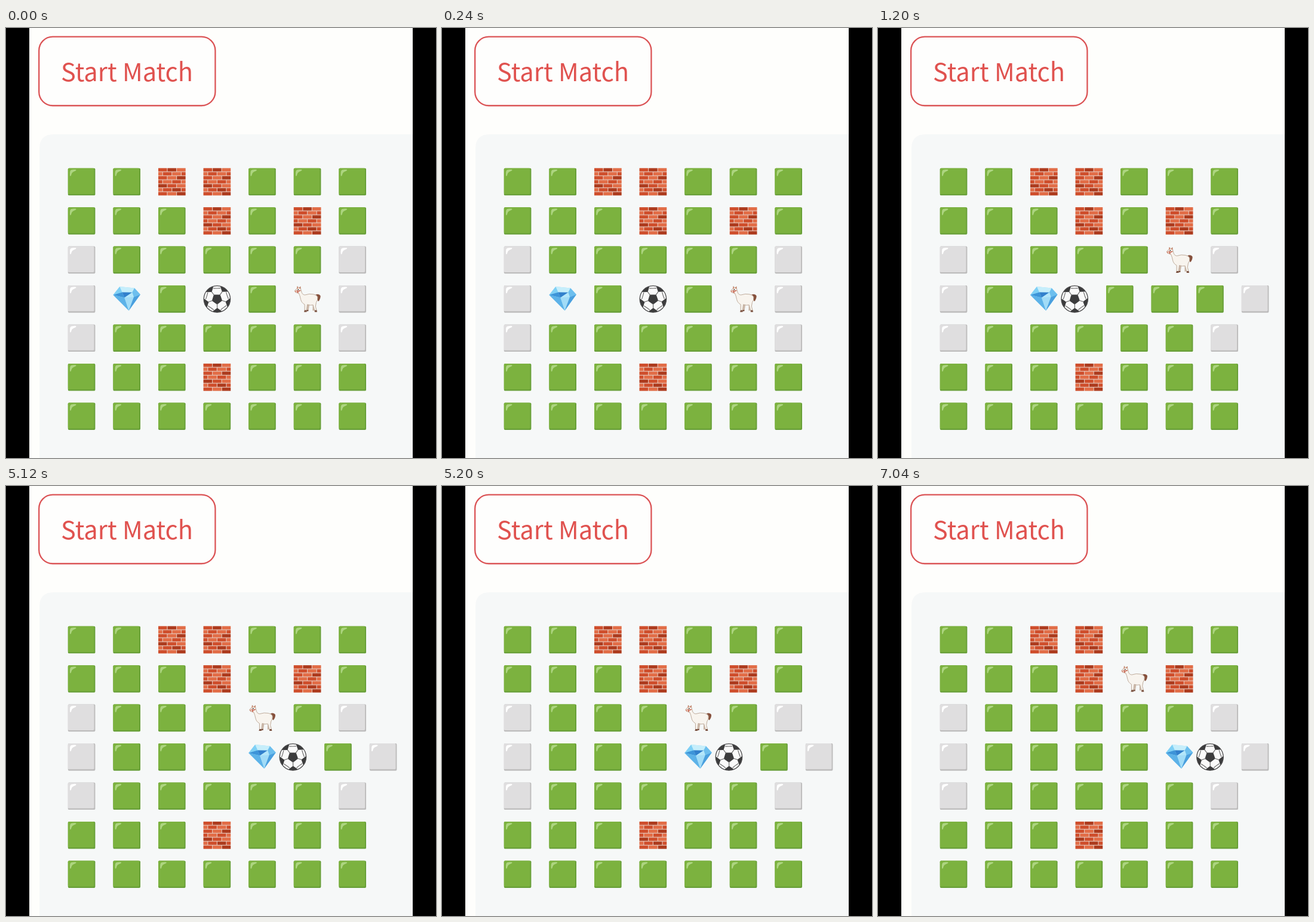
Write an HTML page that moves like this. It is 720 px wide and 720 px high and loops after 8000 ms.

```html
<!DOCTYPE html>
<html lang="en">
<head>
<meta charset="utf-8">
<title>Start Match</title>
<style>
  html, body { margin: 0; width: 100%; height: 100%; overflow: hidden; background: #000; }
  svg { display: block; width: 100%; height: 100%; }
  text { font: 41.6px "Noto Sans CJK JP", "Noto Sans CJK SC", "Noto Sans CJK", "Open Sans", sans-serif; }
  #board, #button { filter: blur(.45px); }
</style>
</head>
<body>
<svg viewBox="0 0 720 720">
  <defs>
    <clipPath id="disc"><circle cx="64" cy="64" r="59"/></clipPath>
    <path id="glare" d="M40 13c0-2.300-1.600-3-10.800-2.700c-7.700.3-11.500 1.200-13.800 4c-2.300 2.800-2.900 8.500-3 15.300c0 4.800 0 9.300 2.500 9.300c3.400 0 3.400-7.900 6.200-12.300C26.700 18 40 17 40 13z"/>
    <g id="grass">
      <rect x="4" y="4" width="120" height="120" rx="5" fill="#689f38"/>
      <rect x="4" y="4" width="115" height="114" rx="5" fill="#7cb23f"/>
      <use href="#glare" fill="#add580"/>
    </g>
    <g id="goal">
      <rect x="4" y="4" width="120" height="120" rx="5" fill="#bdbcbc"/>
      <rect x="4" y="4" width="115" height="114" rx="5" fill="#dfdedf"/>
      <use href="#glare" fill="#fff"/>
    </g>
    <g id="wall"></g>
    <g id="gem">
      <path fill="#9addf8" d="M4 46L33 9L98 16L124 44L73 115Z"/>
      <path fill="#7fd0f5" d="M4 46L33 9L44 34Z"/>
      <path fill="#c6eefb" d="M33 9L98 16L88 35L44 34Z"/>
      <path fill="#3d94d8" d="M4 46L44 34L54 58Z"/>
      <path fill="#3280cc" d="M44 34L88 35L54 58Z"/>
      <path fill="#6dbfee" d="M98 16L124 44L95 55L88 35Z"/>
      <path fill="#b4e6fa" d="M88 35L95 55L54 58Z"/>
      <path fill="#5db2e8" d="M4 46L54 58L73 115Z"/>
      <path fill="#a2dcf7" d="M54 58L95 55L73 115Z"/>
      <path fill="#4a9fde" d="M95 55L124 44L73 115Z"/>
    </g>
    <g id="ball"></g>
    <g id="llama" stroke-linejoin="round">
      <path fill="#86503c" d="M98 46Q115 38 122 50Q122 64 113 74Q104 66 98 46Z"/>
      <path fill="#cdb9aa" d="M62 82L74 86L69 115H62ZM88 82L99 80L93 96L95 115H87Z"/>
      <path fill="#f8f4ee" stroke="#bba796" stroke-width="2.500" d="M8 29Q12 20 20 17L21 8L27 16L33 9Q35 22 38 31Q41 45 53 46Q73 39 91 43Q105 45 109 55Q111 69 103 79L100 96L106 119H97L89 90Q77 93 64 88L60 119H52L52 88Q38 80 35 66Q32 49 26 38L13 35Z"/>
      <path fill="#cb7b60" d="M19 7L24 17L18 19ZM34 8L33 19L27 16Z"/>
      <path fill="#d99784" d="M8 29L13 25L17 35L12 35Z"/>
      <path fill="none" stroke="#c55e49" stroke-width="4" d="M18 24L23 38M22 31L34 26"/>
      <circle cx="24" cy="23" r="2.500" fill="#332b28"/>
      <path fill="#7a5140" d="M52 113H61V121H49ZM97 113H105L107 121H96ZM62 112H69L68 118H61Z"/>
    </g>
  </defs>
  <rect x="39" width="642" height="720" fill="#fefefc"/>
  <path fill="#f6f8f8" d="M681 178H80Q56 178 56 202V720H681Z"/>
  <g id="button">
    <rect x="55.200" y="14.700" width="295.200" height="115.300" rx="23" fill="#fefefd" stroke="#db5355" stroke-width="2.300"/>
    <text x="202.500" y="89" text-anchor="middle" fill="#e0524f">Start Match</text>
  </g>
  <g id="board"></g>
</svg>
<script>
const el = id => document.getElementById(id);

// Running bond of seven courses; each letter picks a brick colour
function buildWall() {
  const colors = { d: "#ad3b1e", m: "#cf4e2c", l: "#e26d47" };
  const courses = ["mdl", "lmlm", "mld", "mlml", "dml", "lmdm", "mld"];
  let art = '<rect x="4" y="4" width="120" height="120" fill="#e6c4b7"/>';
  courses.forEach((course, row) => [...course].forEach((c, i) => {
    const start = 4 + i * 41 - row % 2 * 20.500;
    const x = Math.max(4, start), end = Math.min(124, start + 38);
    art += `<rect x="${x}" y="${4 + row * 17.600}" width="${end - x}" height="14.400" fill="${colors[c]}"/>`;
  }));
  el("wall").innerHTML = art;
}

function buildBall() {
  const polar = (r, deg, cx = 64, cy = 64) => {
    const a = deg * Math.PI / 180;
    return [cx + r * Math.cos(a), cy + r * Math.sin(a)];
  };
  const pentagon = (r, turn, cx, cy) =>
    "M" + [0, 1, 2, 3, 4].map(i => polar(r, turn + i * 72, cx, cy)).join("L") + "Z";
  let patches = pentagon(24, 17), seams = "";
  for (let i = 0; i < 5; i++) {
    const angle = 17 + i * 72;
    patches += pentagon(20, angle + 180, ...polar(59, angle));
    seams += `M${polar(20, angle)}L${polar(40, angle)}M${polar(50, angle + 18)}L${polar(47, angle + 36)}`
      + `L${polar(50, angle + 54)}`;
  }
  el("ball").innerHTML = `<circle cx="64" cy="64" r="59" fill="#fafafa"/>
    <g clip-path="url(#disc)"><path d="${patches}" fill="#3c3c3d"/>
    <path d="${seams}" fill="none" stroke="#666" stroke-width="3"/></g>
    <circle cx="64" cy="64" r="58.500" fill="none" stroke="#4a4a4b" stroke-width="3.500"/>`;
}

const kinds = { g: "grass", b: "wall", w: "goal" };
const field = ["ggbbggg", "gggbgbg", "wgggggw", "wgggggw", "wgggggw", "gggbggg", "ggggggg"];

// Positions are [row, column]; the ball shares its holder's cell
const turns = [
  { at: 0, gem: [3, 1], llama: [3, 5], ball: [3, 3] },
  { at: 1200, gem: [3, 2], llama: [2, 5], ball: [3, 2] },
  { at: 3200, gem: [3, 3], llama: [2, 4], ball: [2, 4] },
  { at: 5120, gem: [3, 4], llama: [2, 4], ball: [3, 4] },
  { at: 7040, gem: [3, 5], llama: [1, 4], ball: [3, 5] }
];

function drawTurn(turn) {
  let art = "";
  field.forEach((line, row) => {
    let x = 126.600;
    [...line].forEach((c, col) => {
      const pieces = ["gem", "llama", "ball"].filter(p => turn[p][0] === row && turn[p][1] === col);
      for (const id of pieces.length ? pieces : [kinds[c]]) {
        art += `<use href="#${id}" transform="translate(${x} ${257.500 + row * 65.450}) scale(.38) translate(-64 -64)"/>`;
        x += 51.400;
      }
      x += 24.200;
    });
  });
  el("board").innerHTML = art;
}

let shown;
function frame() {
  const t = performance.now() % 8000;
  const turn = turns.findLast(s => s.at <= t);
  if (turn !== shown) drawTurn(shown = turn);
  requestAnimationFrame(frame);
}

buildWall();
buildBall();
frame();
</script>
</body>
</html>
```
